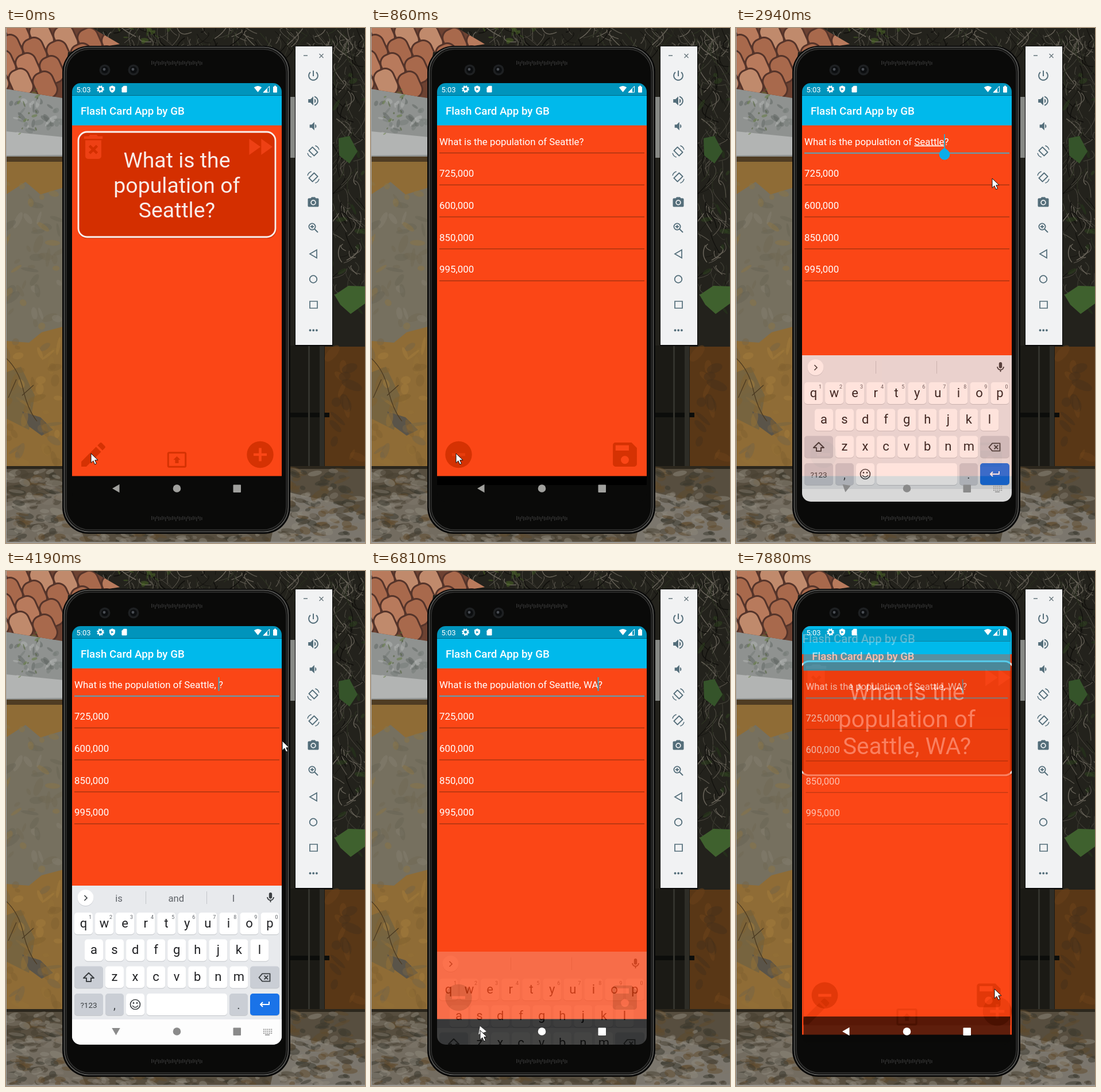
Animation of 625 by 897 pixels, one loop 8 s. Source, as an HTML page:

```html
<!DOCTYPE html>
<html lang="en">
<head>
<meta charset="utf-8">
<title>Flash card editing</title>
<style>
  html, body { margin: 0; width: 100%; height: 100%; overflow: hidden; background: #1c1e19; }
  svg { display: block; width: 100vw; height: 100vh; }
  text { font-family: Roboto, sans-serif; white-space: pre; }
</style>
</head>
<body>
<svg id="stage" viewBox="0 0 625 897"></svg>
<script>
const LOOP = 8000;
const ORANGE = '#fb4616', DEEP = '#d53203', BLUE = '#00b9eb', SLATE = '#546e7a';

// ---------- markup helpers ----------
const rect = (x, y, w, h, fill, r = 0, more = '') =>
  `<rect x="${x}" y="${y}" width="${w}" height="${h}" rx="${r}" fill="${fill}" ${more}/>`;
const disc = (x, y, r, fill, more = '') => `<circle cx="${x}" cy="${y}" r="${r}" fill="${fill}" ${more}/>`;
const poly = (points, fill) => `<polygon points="${points}" fill="${fill}"/>`;
const line = (d, color, w = 1, more = '') =>
  `<path d="${d}" fill="none" stroke="${color}" stroke-width="${w}" ${more}/>`;
const label = (s, x, y, size, fill, more = '') =>
  `<text x="${x}" y="${y}" font-size="${size}" fill="${fill}" ${more}>${s}</text>`;
const mid = 'text-anchor="middle"';
const group = (id, body, more = '') => `<g id="${id}" ${more}>${body}</g>`;
// 24-unit icon centred on a point
const icon = (d, x, y, s, fill, more = '') =>
  `<path d="${d}" fill="${fill}" transform="translate(${x - 12 * s} ${y - 12 * s}) scale(${s})" ${more}/>`;
const outline = (d, x, y, s, color, w = 2) =>
  icon(d, x, y, s, 'none', `stroke="${color}" stroke-width="${w}" stroke-linejoin="round"`);
const times = (n, f) => Array.from({ length: n }, (_, i) => f(i)).join('');

let seed = 11;
const rnd = () => (seed = (seed * 16807) % 2147483647) / 2147483647;
const pick = a => a[Math.floor(rnd() * a.length)];
// soft blotches, tilted by at most `tilt` degrees
const scatter = (n, x, y, w, h, colors, size, tilt = 90) => times(n, () => {
  const cx = x + rnd() * w, cy = y + rnd() * h, a = (rnd() * 2 - 1) * tilt;
  return `<ellipse rx="${size * (.4 + rnd())}" ry="${size * (.2 + rnd() * .4)}" fill="${pick(colors)}" ` +
    `opacity=".5" transform="translate(${cx} ${cy}) rotate(${a})"/>`;
});
const twigs = (n, x, y, w, h, colors) => times(n, () => {
  const px = x + rnd() * w, py = y + rnd() * h;
  return line(`M${px} ${py}q${rnd() * 30 - 15} ${rnd() * 20} ${rnd() * 60 - 30} ${10 + rnd() * 30}`, pick(colors), .6 + rnd());
});

const PATH = {
  power: 'M13 3h-2v10h2V3zm4.83 2.17l-1.42 1.42C17.99 7.86 19 9.81 19 12c0 3.87-3.13 7-7 7s-7-3.13-7-7c0-2.19 1.01-4.14 2.58-5.42L6.17 5.17C4.23 6.82 3 9.26 3 12c0 4.97 4.03 9 9 9s9-4.03 9-9c0-2.74-1.23-5.18-3.17-6.83z',
  quiet: 'M5 9v6h4l5 5V4L9 9zM15.5 8v8c1.5-.7 2.5-2.2 2.5-4s-1-3.3-2.5-4z',
  loud: 'M3 9v6h4l5 5V4L7 9zm13.5 3c0-1.77-1-3.3-2.5-4v8c1.5-.7 2.5-2.2 2.5-4zM14 3.23v2.06c2.89.86 5 3.54 5 6.71s-2.11 5.85-5 6.71v2.06c4-.91 7-4.49 7-8.77s-3-7.86-7-8.77z',
  camera: 'M9 2L7.17 4H4c-1.1 0-2 .9-2 2v12c0 1.1.9 2 2 2h16c1.1 0 2-.9 2-2V6c0-1.1-.9-2-2-2h-3.17L15 2zm3 15a5 5 0 1 1 0-10a5 5 0 1 1 0 10z',
  trash: 'M6 19c0 1.1.9 2 2 2h8c1.1 0 2-.9 2-2V7H6zm2.46-7.12l1.41-1.41L12 12.59l2.12-2.12 1.41 1.41L13.41 14l2.12 2.12-1.41 1.41L12 15.41l-2.12 2.12-1.41-1.41L10.59 14zM15.5 4l-1-1h-5l-1 1H5v2h14V4z',
  next: 'M4 18l8.5-6L4 6zm9-12v12l8.5-6z',
  pencil: 'M3 17.25V21h3.75L17.81 9.94l-3.75-3.75zM20.71 7.04c.39-.39.39-1.02 0-1.41l-2.34-2.34c-.39-.39-1.02-.39-1.41 0l-1.83 1.83 3.75 3.75z',
  present: 'M21 3H3c-1.11 0-2 .89-2 2v14c0 1.11.89 2 2 2h18c1.11 0 2-.89 2-2V5c0-1.11-.89-2-2-2zm0 16H3V5h18zM10 12H8l4-4 4 4h-2v4h-4z',
  save: 'M17 3H5c-1.11 0-2 .9-2 2v14c0 1.1.89 2 2 2h14c1.1 0 2-.9 2-2V7zm-5 16a3 3 0 1 1 0-6a3 3 0 1 1 0 6zm3-10H5V5h10z',
  card: 'M18 2h-8L4 8v12c0 1.1.9 2 2 2h12c1.1 0 2-.9 2-2V4c0-1.1-.9-2-2-2z',
  shield: 'M12 1L3 5v6c0 5.5 3.8 10.7 9 12 5.2-1.3 9-6.5 9-12V5zM9 8l7 4-7 4z',
  wifi: 'M12 21L.5 7C8 1 16 1 23.5 7z',
  mic: 'M12 14a3 3 0 0 0 3-3V5a3 3 0 0 0-6 0v6a3 3 0 0 0 3 3zm5-3a5 5 0 0 1-10 0H5c0 3.5 2.6 6.4 6 6.9V21h2v-3.1c3.4-.5 6-3.4 6-6.9z',
  shift: 'M12 4L3 13h5v6h8v-6h5z',
  erase: 'M8 5h14v14H8L2 12zM11.5 8.5l7 7m0-7l-7 7',
  enter: 'M20 7v5H5m4-4l-4 4 4 4',
  turn: 'M10.5 4L20 13.5 13.5 20 4 10.5z',
  turnArcs: 'M15.5 1.5a10 10 0 0 1 7 7.5M8.5 22.5a10 10 0 0 1-7-7.5'
};

// ---------- backdrop ----------
const BARK = ['#57534a', '#3b3a31', '#6a655b', '#2b3021', '#100f0c'];
const SOIL = ['#453d2f', '#7d766a', '#5f4a2c', '#38352b', '#8d877b'];

function roof() {
  const tile = (r, c) => {
    const x = -34 + c * 42 + r * 12, y = 66 - r * 27 + c * 5;
    return `<rect x="${x}" y="${y}" width="36" height="48" rx="15" fill="${pick(['#b87a5c', '#a8694c', '#c08a6c'])}" ` +
      `stroke="#55342a" stroke-width="3" transform="rotate(-24 ${x + 18} ${y + 24})"/>`;
  };
  const rows = times(4, i => times(3 + (3 - i), c => tile(3 - i, c)));
  return '<clipPath id="eaves"><polygon points="0,0 150,0 198,28 108,42 98,122 0,106"/></clipPath>' +
    `<g clip-path="url(#eaves)">${rect(0, 0, 200, 125, '#6d4232')}${rows}</g>`;
}

function backdrop() {
  return rect(0, 0, 625, 897, '#23221c') +
    twigs(170, 170, -20, 455, 60, BARK) + twigs(170, 560, 0, 65, 450, BARK) +
    scatter(10, 195, 0, 90, 26, ['#4d6a28', '#39521f'], 6) +
    scatter(14, 575, 80, 50, 420, ['#2f4420', '#263a1a'], 8) +
    poly('579,192 598,188 612,215 598,236 580,222', '#35542a') +
    poly('572,465 596,449 625,450 625,480 600,498 582,482', '#3f612e') +
    // plaster ledge and wall
    poly('0,98 50,112 100,120 100,228 0,230', '#8f9290') +
    poly('0,180 100,190 100,221 0,222', '#b2b4b3') +
    scatter(34, 0, 125, 98, 60, ['#737976', '#b3b6b4', '#5d635f'], 8) +
    roof() +
    scatter(16, 20, 105, 40, 80, ['#60773a', '#48592e'], 4) +
    rect(0, 226, 100, 545, '#8f6c36') + rect(0, 224, 100, 9, '#4f3c23') +
    poly('0,290 34,268 60,290 100,278 100,520 62,530 40,548 0,545', '#76705f') +
    poly('0,600 26,590 50,640 40,700 0,680', '#77643f') +
    poly('28,668 60,678 82,700 62,710 40,694', '#5a5449') +
    scatter(50, 0, 270, 95, 250, ['#847e70', '#676354', '#8a7346', '#6f6754'], 12) +
    scatter(45, 0, 540, 95, 220, ['#937036', '#a37b3c', '#756445', '#80602f'], 12) +
    line('M0 575q22 20 30 55t24 55M18 612l-14 32M28 640l20-18', '#493820', 1.2) +
    // right-hand wall
    rect(493, 120, 12, 106, '#868884') + rect(493, 553, 62, 220, '#1b1a15') +
    rect(555, 555, 70, 212, '#593716') + rect(493, 670, 70, 8, '#0c0d0b') +
    rect(526, 553, 3, 215, '#33332d') + rect(546, 553, 8, 215, '#2e2d27') +
    scatter(16, 560, 560, 65, 195, ['#6d431a', '#46301a'], 14) +
    // ground
    rect(0, 765, 625, 132, '#574e3f') + rect(0, 763, 100, 5, '#2c271d') + rect(493, 763, 132, 5, '#2c271d') +
    poly('0,826 100,806 140,897 0,897', '#736c60') + poly('480,806 570,826 625,850 625,897 460,897', '#7b766d') +
    scatter(130, 0, 770, 110, 128, SOIL, 11, 25) +
    scatter(130, 485, 770, 140, 128, SOIL, 11, 25) +
    scatter(70, 90, 880, 410, 16, SOIL, 9, 25) +
    rect(0, 0, 1, 897, '#a5a5a5') + rect(0, 895, 625, 2, '#9a9894');
}

// ---------- phone and emulator bar ----------
function phone() {
  const grille = y => times(30, i => rect(253 + i * 3, y + (i % 3), 1.5, 7 - (i % 2) * 2, '#303030'));
  const lens = x => disc(x, 73, 9.5, '#1e2022') + disc(x, 73, 6, '#0c0e10') + disc(x - 1, 72, 2.4, '#4a4e54');
  return rect(98, 31, 397, 850, '#070707', 46) +
    rect(101.5, 33.5, 390, 844, '#121211', 43, 'stroke="#5b5b59" stroke-width="1.6"') +
    rect(105, 37, 383, 837, '#0a0a09', 40, 'stroke="#333332" stroke-width="1.4"') +
    grille(57) + grille(850) + lens(172) + lens(222);
}

function toolbar() {
  const turn = (y, flip) => `<g transform="translate(535 ${y}) scale(${flip} 1)">` +
    outline(PATH.turn, 0, 0, .95, SLATE, 2) + outline(PATH.turnArcs, 0, 0, .95, SLATE, 1.5) + '</g>';
  return rect(503, 31, 66, 523, '#080808') + rect(504, 32, 64, 520, '#f1f2f3') +
    line('M518 48h7M545.5 45l7 7m0-7l-7 7', '#66757c', 1.3) +
    icon(PATH.power, 535, 83, .98, SLATE) + icon(PATH.loud, 535, 127, .98, SLATE) +
    icon(PATH.quiet, 535, 171, .9, SLATE) + turn(215, 1) + turn(260, -1) +
    icon(PATH.camera, 535, 304, .95, SLATE) + disc(535, 304, 3, SLATE) +
    disc(533, 346, 5.6, 'none', `stroke="${SLATE}" stroke-width="1.8"`) +
    line('M537 350l6 6M530 346h6m-3-3v6', SLATE, 1.8) +
    line('M529 393.5l12-7v14z', SLATE, 1.7) +
    disc(535, 437.5, 6.3, 'none', `stroke="${SLATE}" stroke-width="1.8"`) +
    line('M529 476h13v12h-13z', SLATE, 1.7) +
    times(3, i => disc(529.5 + i * 5.7, 526.5, 1.9, SLATE));
}

// ---------- app screens ----------
const header = () => rect(115, 96, 365, 730, '#0a0a09') + rect(115, 118, 365, 662.4, ORANGE) +
  rect(115, 118, 365, 51.6, BLUE) + rect(115, 96, 365, 21.7, '#0094bc') +
  label('Flash Card App by GB', 130, 151, 18.75, '#fff', 'font-weight="500"');

function home() {
  return header() +
    rect(125, 182, 346, 185, '#b42d07', 16, 'opacity=".5"') +
    rect(126, 181, 343, 183, '#d42f00', 15, 'stroke="#faf1ee" stroke-width="2.8"') +
    icon(PATH.trash, 152, 207, 2.32, '#ee4014') + icon(PATH.next, 442, 207, 2.32, '#ee4014') +
    ['What is the', 'population of', 'Seattle?'].map((s, i) =>
      label(s, 297.5, 243 + i * 43.6, 37.4, '#f9ece8', mid + (i === 2 ? ' id="lastLine"' : ''))).join('') +
    icon(PATH.pencil, 152, 743, 2.32, DEEP) + icon(PATH.present, 297.5, 752, 1.52, DEEP) +
    disc(442.5, 743, 23.2, DEEP) + line('M431 743h23M442.5 731.5v23', ORANGE, 4.6);
}

function editor() {
  return header() + rect(115, 781, 365, 15, '#000') +
    '<text id="question" x="119" y="203.5" font-size="16.85" fill="#fff"><tspan id="before"></tspan>' +
    '<tspan id="word"></tspan><tspan>?</tspan></text>' +
    times(5, i => rect(119, 217 + i * 55.7, 357, 1.2, '#97300f')) +
    rect(119, 216.7, 357, 2.4, '#6a97a6', 0, 'id="focus"') +
    ['725,000', '600,000', '850,000', '995,000'].map((s, i) => label(s, 119, 259.2 + i * 55.7, 16.85, '#fff')).join('') +
    rect(0, 185, 2, 24, '#3fa3c0', 0, 'id="caret"') +
    disc(152.5, 743, 23.2, DEEP) + rect(141, 740.5, 23, 5, ORANGE, 0, 'id="minus"') +
    icon(PATH.save, 442, 743, 2.32, DEEP) +
    '<path id="handle" d="M363 208.5l6.8 5.5a9.3 9.3 0 1 1-13.6 0z" fill="#0badea"/>';
}

function keyboard() {
  const key = (x, y, w, fill = '#fff') => rect(x, y + 1, w, 38, '#c3c6ca', 5) + rect(x, y, w, 38, fill, 5);
  const row = (letters, x, y) => [...letters].map((c, i) =>
    key(x + i * 36.05, y, 32) + label(c, x + i * 36.05 + 16, y + 25.5, 22, '#202124', mid)).join('');
  const grey = '#caced5', ink = '#3c4043';
  return rect(115, 548, 365, 278, '#e8eaed') + rect(115, 781, 365, 150, '#fdfdfd') +
    disc(138.5, 570, 14, '#c8cbd0') + disc(138.5, 569, 14, '#fff') + line('M136.5 565l4.5 4.5-4.5 4.5', ink, 1.7) +
    rect(243, 558, 1, 22, '#c2c5c9') + rect(349, 558, 1, 22, '#c2c5c9') +
    times(3, i => label('', 196.5 + i * 99.8, 576, 16.7, '#5f6368', mid + ' class="hint"')) +
    icon(PATH.mic, 460.5, 569, .9, ink) +
    row('qwertyuiop', 119, 595) + row('asdfghjkl', 137, 641.5) + row('zxcvbnm', 173, 688.5) +
    times(10, i => label((i + 1) % 10, 146.5 + i * 36.05, 605.5, 9, '#5f6368', mid)) +
    key(119, 688.5, 50, grey) + outline(PATH.shift, 144, 708, 1, ink) +
    key(425, 688.5, 51, grey) + outline(PATH.erase, 450, 708, .95, ink) +
    key(119, 736, 50, grey) + label('?123', 144, 760.5, 13.5, ink, mid) +
    key(173, 736, 32, grey) + label(',', 189, 763, 20, ink, mid) +
    key(209, 736, 32) + disc(225, 755, 8.5, 'none', `stroke="${ink}" stroke-width="1.7"`) +
    disc(222, 752.5, 1.4, ink) + disc(228, 752.5, 1.4, ink) + line('M220 757q5 6 10 0', ink, 1.5) +
    key(245, 736, 140) + key(389, 736, 32, grey) + label('.', 405, 763, 20, ink, mid) +
    key(425, 736, 51, '#1a73e8') + outline(PATH.enter, 450, 755, 1, '#fff');
}

function statusBar() {
  return label('5:03', 122.5, 111.5, 13, '#fff') +
    disc(164.5, 106.5, 3.7, 'none', 'stroke="#fff" stroke-width="2.6"') +
    disc(164.5, 106.5, 5.5, 'none', 'stroke="#fff" stroke-width="1.8" stroke-dasharray="2.3 2.02"') +
    icon(PATH.shield, 185, 106.5, .56, '#fff', 'fill-rule="evenodd"') + icon(PATH.card, 206, 106.5, .57, '#fff') +
    icon(PATH.wifi, 438.5, 106.5, .58, '#fff') +
    line('M448 112l10.5-10.5v10.5z', '#fff', 1) + poly('447.5,112.5 455,105 455,112.5', '#fff') +
    rect(465, 102, 7, 10.5, '#fff', 1) + rect(467, 100.5, 3, 2, '#fff');
}

const navIcons = () =>
  '<path id="back" d="M-6.5 0L6-7.2V7.2z"/>' + '<circle cx="297.5" cy="802" r="6.8"/>' +
  '<rect x="395.5" y="795.5" width="13.5" height="13.5" rx="1"/>' +
  group('switcher', times(3, r => times(5, c => rect(448 + c * 3.3, 797.5 + r * 3.3, 2, 2, '#9a9a9a'))) +
    rect(451, 807, 8, 1.8, '#9a9a9a'));

document.getElementById('stage').innerHTML =
  '<defs><clipPath id="glass"><rect x="115" y="96" width="365" height="729" rx="15"/></clipPath></defs>' +
  backdrop() + phone() + toolbar() +
  group('screen', group('home', home()) + group('editor', editor()) + group('keys', keyboard()) +
    group('nav', navIcons()) + statusBar(), 'clip-path="url(#glass)"') +
  '<path id="pointer" d="M0 0v16.5l3.9-3.7 2.7 6.2 2.9-1.2-2.7-6.1h5.3z" fill="#fff" stroke="#111" stroke-width="1"/>';

// ---------- timeline: each row holds from its time until the next ----------
const POINTER = [[0, 148, 741], [1010, 172, 690], [1160, 240, 540], [1310, 325, 360], [1460, 375, 248],
  [1610, 345, 218], [1760, 323, 196], [2040, 345, 195], [2190, 363, 192], [2820, 385, 212], [2940, 446, 262],
  [3060, 481, 296], [5730, 448, 375], [5880, 350, 570], [6030, 235, 760], [6150, 196, 811], [6450, 192, 804],
  [6690, 190, 800], [7080, 225, 792], [7200, 310, 770], [7320, 400, 748], [7450, 440, 734], [7600, 450, 728]];
// home scale, editor scale, editor opacity
const SCENE = [[0, 1, 1, 0], [620, 1.025, .93, .35], [740, 1.05, .985, .9], [860, 0, 1, 1], [7880, 1.085, .986, .65]];
// keyboard drop, opacity, turn of the back arrow
const KEYS = [[0, 277, 0, 0], [2820, 115, .24, -40], [2940, 22, .85, -80], [3060, 0, 1, -90],
  [6810, 115, .24, -50], [6960, 277, 0, 0]];
const TYPED = [[0, 'Seattle', ''], [2310, '', 'Seattle'], [3730, 'Seattle,', ''], [4190, 'Seattle, ', ''],
  [4770, 'Seattle, ', 'W'], [5050, 'Seattle, ', 'WA'], [6690, 'Seattle, WA', '']];
const HINTS = [[0, '', '', ''], [3060, 'Seattle', '', ''], [3880, 'is', 'and', 'I'],
  [5300, 'WA', 'WAS', 'WANT'], [6690, '', '', '']];
const CARET = [[0, 0], [2310, 1], [3210, 0], [3730, 1], [4620, 0], [4770, 1], [5730, 0], [6300, 1], [7200, 0], [7600, 1]];

const at = (table, t) => table.filter(row => row[0] <= t).pop().slice(1);
const el = id => document.getElementById(id);
const set = (id, attrs) => { for (const k in attrs) el(id).setAttribute(k, attrs[k]); };
const show = (id, on) => set(id, { visibility: on ? 'visible' : 'hidden' });
const zoom = s => `translate(297.5 460) scale(${s}) translate(-297.5 -460)`;

function draw(t) {
  const [x, y] = at(POINTER, t);
  set('pointer', { transform: `translate(${x} ${y})` });

  const [homeScale, editScale, editAlpha] = at(SCENE, t);
  set('home', { transform: zoom(homeScale || 1), display: homeScale ? 'inline' : 'none' });
  set('editor', { transform: zoom(editScale), opacity: editAlpha });
  el('lastLine').textContent = t < 7000 ? 'Seattle?' : 'Seattle, WA?';
  set('minus', { opacity: t < 1010 ? .5 : 1 });

  const [before, word] = at(TYPED, t);
  el('before').textContent = 'What is the population of ' + before;
  el('word').textContent = word;
  set('word', { 'text-decoration': word ? 'underline' : 'none' });
  const question = el('question');
  const end = question.getSubStringLength(0, question.textContent.length - 1);
  set('caret', { x: 118.5 + end, opacity: at(CARET, t)[0] });
  set('focus', { opacity: t < 2310 ? 0 : 1 });
  set('handle', { opacity: t >= 2310 && t < 3060 ? 1 : 0 });

  const [drop, alpha, turn] = at(KEYS, t);
  set('keys', { transform: `translate(0 ${drop})`, opacity: alpha });
  const hints = at(HINTS, t);
  document.querySelectorAll('.hint').forEach((h, i) => h.textContent = hints[i]);

  const focused = t >= 2310;
  set('nav', { fill: t >= 6810 ? '#fff' : focused ? '#8a8a8a' : '#a0a09d' });
  set('back', { transform: `translate(191.5 802) rotate(${turn})` });
  show('switcher', t >= 2550 && t < 6810);
}

const start = performance.now();
function tick() {
  draw((performance.now() - start) % LOOP);
  requestAnimationFrame(tick);
}
tick();
</script>
</body>
</html>
```
